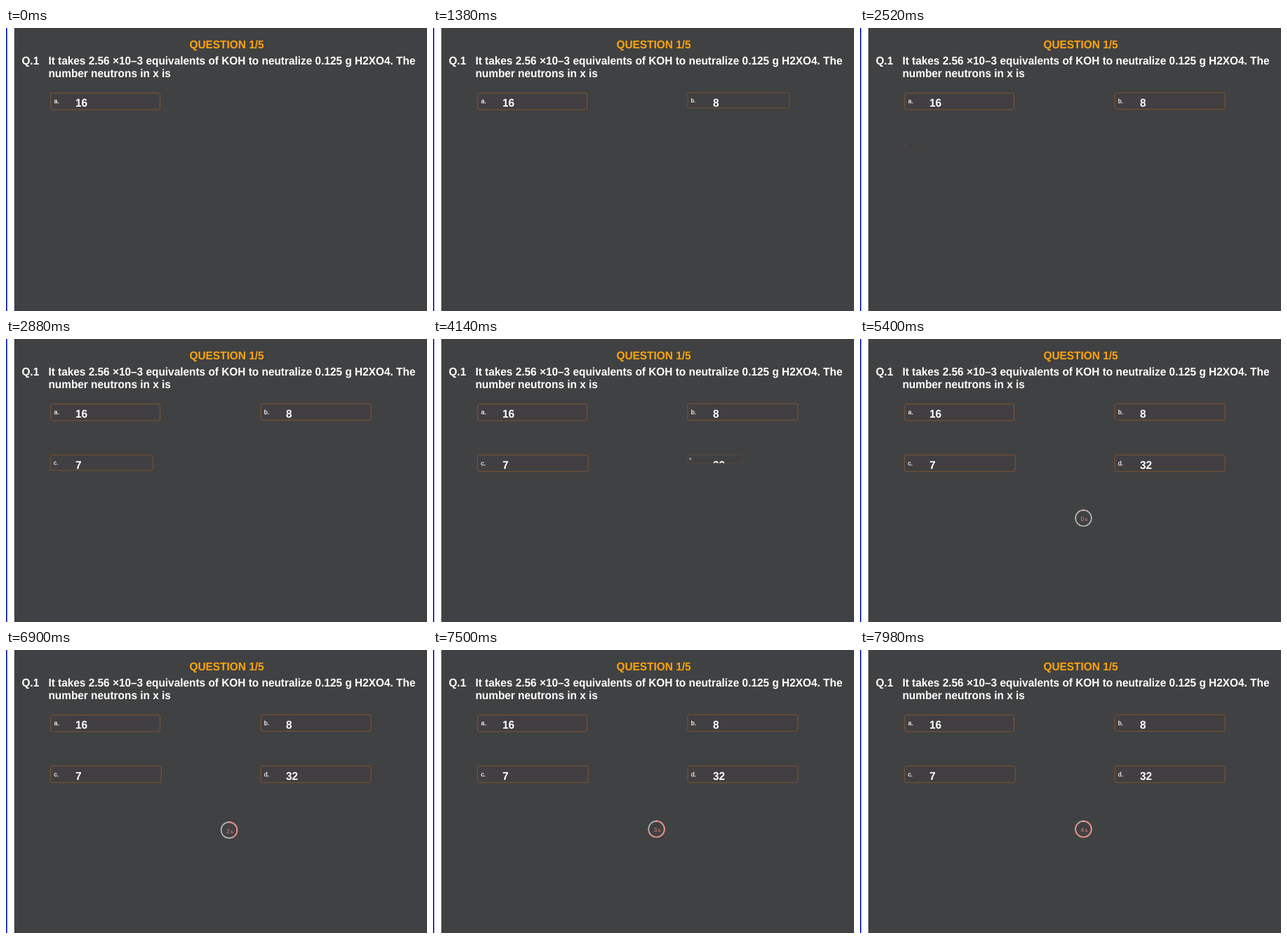
An HTML page that plays this animation: 600 px wide and 403 px high, repeating every 8000 ms.

```html
<!DOCTYPE html>
<html lang="en">
<head>
<meta charset="utf-8">
<title>Quiz question</title>
<style>
html, body { margin: 0; width: 100%; height: 100%; overflow: hidden; background: #404142; }
svg { display: block; width: 600px; height: 403px; font-family: "Liberation Sans", Arial, sans-serif; text-rendering: geometricPrecision; }
/* Slightly tall letters, scaled about the baseline */
.big { font-size: 15.4px; font-weight: bold; fill: #fff; transform: scaleY(1.05); transform-box: fill-box; transform-origin: 0 81%; }
.title { fill: #ffa50a; }
.label { font-size: 8.8px; fill: #f6f6f6; stroke: #f6f6f6; stroke-width: .25; }
.box { fill: #413f42; stroke: #80552f; stroke-width: 1; }
.ring { fill: none; stroke-width: 1.7; }
</style>
</head>
<body>
<svg viewBox="0 0 600 403">
  <rect width="600" height="403" fill="#404142"/>
  <rect width="11.8" height="403" fill="#fff"/>
  <rect width="1.7" height="403" fill="#0a1eb0"/>
  <text class="big title" x="261.5" y="29.5">QUESTION 1/5</text>
  <text class="big" x="22.4" y="52.3">Q.1</text>
  <text class="big" x="60.4" y="52.3">It takes 2.56 ×10–3 equivalents of KOH to neutralize 0.125 g H2XO4. The</text>
  <text class="big" x="60.4" y="70.1">number neutrons in x is</text>
  <g id="options"></g>
  <g id="timer">
    <circle class="ring" r="11.4" stroke="#b7b4b2"/>
    <circle id="arc" class="ring" r="11.4" stroke="#ea8a80" pathLength="1" transform="rotate(-90)"/>
    <circle cy="-11.4" r="1.2" fill="#ee9b90"/>
    <text id="digit" x="-3.9" y="4.3" font-size="8.6" fill="#d08a84">0</text>
    <text x="1.9" y="4.3" font-size="7" font-weight="bold" fill="#dc7068">s</text>
  </g>
</svg>
<script>
const LOOP = 8000, STEP = 60, GROW = 565, BOX_H = 23.6;
const byId = id => document.getElementById(id);

function add(parent, tag, attrs, text = "") {
  const el = document.createElementNS("http://www.w3.org/2000/svg", tag);
  for (const name in attrs) el.setAttribute(name, attrs[name]);
  el.textContent = text;
  parent.append(el);
  return el;
}

const options = [
  { label: "a.", answer: "16", x: 63.8, y: 92.6, w: 155.7, textX: 99, base: 112.4, start: -GROW },
  { label: "b.", answer: "8", x: 363, y: 92.1, w: 157, textX: 399, base: 112.4, start: 955 },
  { label: "c.", answer: "7", x: 63.4, y: 165.2, w: 157.8, textX: 99, base: 185.4, start: 2455 },
  { label: "d.", answer: "32", x: 363, y: 165.2, w: 157, textX: 399, base: 185.4, start: 3955 }
];

options.forEach((o, i) => {
  const root = byId("options");
  o.group = add(root, "g", {});
  o.box = add(o.group, "rect", { class: "box", width: o.w, height: BOX_H, rx: 2.2 });
  add(o.group, "text", { class: "label", x: 4.8, y: 14.7 }, o.label);
  const clip = add(root, "clipPath", { id: "clip" + i });
  o.clip = add(clip, "rect", { x: o.x, y: o.y });
  const answer = add(root, "g", { "clip-path": `url(#clip${i})` });
  add(answer, "text", { class: "big", x: o.textX, y: o.base }, o.answer);
});

function drawOption(o, t) {
  const p = Math.min(1, Math.max(0, (t - o.start) / GROW));
  const s = Math.sin(p * Math.PI / 2);
  o.group.setAttribute("transform", `translate(${o.x} ${o.y}) scale(${s})`);
  o.box.setAttribute("opacity", .3 + .7 * s);
  o.clip.setAttribute("width", o.w * s);
  o.clip.setAttribute("height", BOX_H * s);
}

// Timer fill as [time, fraction] points
const fill = [[5400, .02], [6000, .04], [6300, .2], [6480, .2], [7320, .64], [LOOP, .89]];

function fillAt(t) {
  for (let i = 1; i < fill.length; i++) {
    const [t0, p0] = fill[i - 1], [t1, p1] = fill[i];
    if (t <= t1) return p0 + (p1 - p0) * Math.max(0, t - t0) / (t1 - t0);
  }
  return fill[fill.length - 1][1];
}

const bump = (t, from, to) => t > from && t < to ? Math.sin(Math.PI * (t - from) / (to - from)) : 0;

function drawTimer(t) {
  byId("timer").setAttribute("visibility", t < 5400 ? "hidden" : "visible");
  const p = fillAt(t), sway = bump(t, 6480, 7380);
  const x = 318.5 + bump(t, 5940, 6360) - .5 * sway;
  const y = 255.1 + 1.4 * sway;
  byId("timer").setAttribute("transform", `translate(${x} ${y})`);
  byId("arc").setAttribute("stroke-dasharray", `${p} 1`);
  byId("digit").textContent = Math.floor(p * 5 + 1e-6);
}

function draw(now) {
  const t = Math.floor(now % LOOP / STEP) * STEP;
  options.forEach(o => drawOption(o, t));
  drawTimer(t);
}

const origin = performance.now();
function tick() {
  draw(performance.now() - origin);
  requestAnimationFrame(tick);
}
tick();
</script>
</body>
</html>
```
